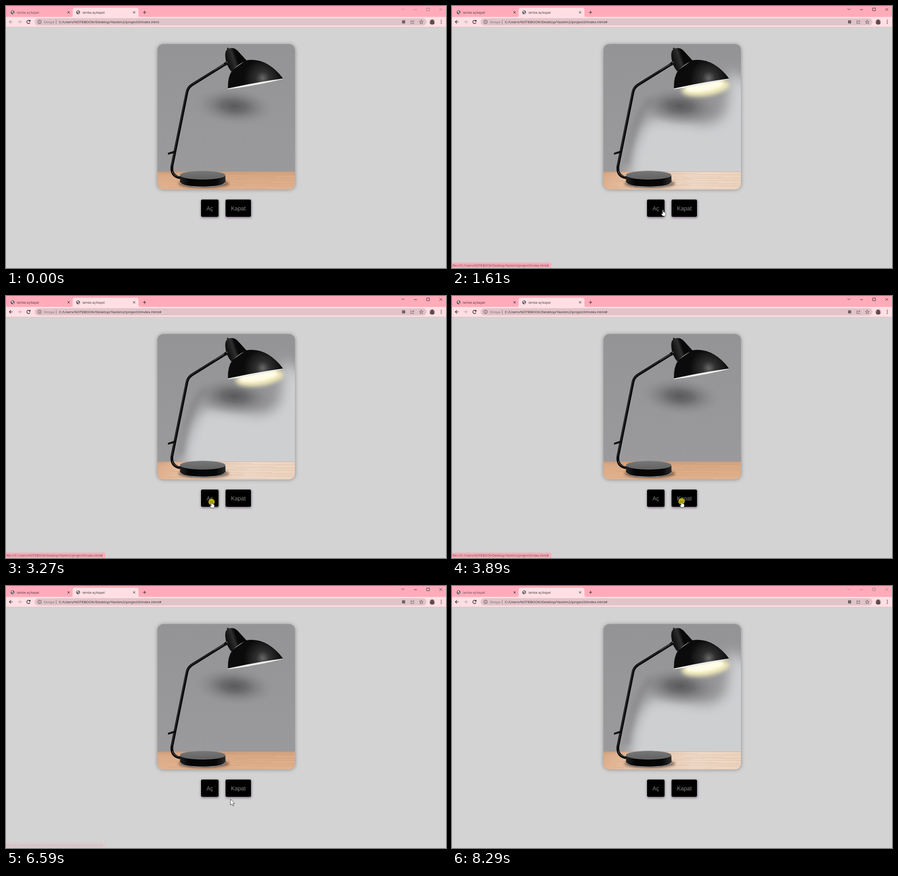
Animation, 970 px wide and 578 px high, one loop 8.35 s. Source, as an HTML page:

```html
<!DOCTYPE html>
<html lang="tr">
<head>
<meta charset="utf-8">
<title>lamba aç/kapat</title>
<style>
html, body { margin: 0; width: 100%; height: 100%; overflow: hidden; background: #d3d3d3; }
svg { display: block; width: 970px; height: 578px; }
text { font-family: "Open Sans", "Noto Sans", sans-serif; font-size: 6.85px; fill: #3b3033; }
.url { font-size: 8px; fill: #2b2528; }
.btn { font: 12.4px "Liberation Sans", Arial, sans-serif; fill: #858585; }
.line { fill: none; stroke: #222; }
.soft { stroke: #5a5053; }
</style>
</head>
<body>
<svg viewBox="0 0 970 578">
  <defs>
    <clipPath id="card"><rect x="334" y="84" width="303" height="320.500" rx="13"/></clipPath>
    <filter id="b2" x="-50%" y="-50%" width="200%" height="200%"><feGaussianBlur stdDeviation="2.500"/></filter>
    <filter id="b5" x="-50%" y="-50%" width="200%" height="200%"><feGaussianBlur stdDeviation="5"/></filter>
    <filter id="b13" x="-50%" y="-50%" width="200%" height="200%"><feGaussianBlur stdDeviation="13"/></filter>
    <linearGradient id="wall" x2="0" y2="1">
      <stop stop-color="#949496"/><stop offset="1" stop-color="#9a9a9c"/>
    </linearGradient>
    <linearGradient id="wood" x2="0" y2="1">
      <stop stop-color="#cf9f7e"/><stop offset=".25" stop-color="#dbaa86"/><stop offset="1" stop-color="#e2b28e"/>
    </linearGradient>
    <linearGradient id="litWood">
      <stop stop-color="#ecd0b9" stop-opacity="0"/><stop offset=".3" stop-color="#ecd0b9" stop-opacity=".8"/>
      <stop offset=".65" stop-color="#efdac9"/><stop offset="1" stop-color="#ecd3be"/>
    </linearGradient>
    <radialGradient id="blob">
      <stop stop-color="#5a5a5c"/><stop offset=".3" stop-color="#646466" stop-opacity=".85"/>
      <stop offset=".7" stop-color="#7d7d7f" stop-opacity=".35"/><stop offset="1" stop-color="#949496" stop-opacity="0"/>
    </radialGradient>
    <radialGradient id="shine" gradientUnits="userSpaceOnUse" cx="566" cy="159" r="42">
      <stop stop-color="#686868"/><stop offset=".35" stop-color="#303030"/><stop offset="1" stop-color="#0b0b0b"/>
    </radialGradient>
    <linearGradient id="neck" gradientUnits="userSpaceOnUse" x1="483" y1="120" x2="519" y2="108">
      <stop stop-color="#080808"/><stop offset=".5" stop-color="#2e2e2e"/><stop offset=".7" stop-color="#080808"/>
    </linearGradient>
    <linearGradient id="top" x2="0" y2="1"><stop stop-color="#777"/><stop offset="1" stop-color="#626262"/></linearGradient>
    <linearGradient id="side"><stop stop-color="#222"/><stop offset=".2" stop-color="#050505"/><stop offset=".8" stop-color="#080808"/><stop offset="1" stop-color="#2c2c2c"/></linearGradient>
    <g id="globe"><circle r="4.200" fill="#5c5358"/><path d="M-3-1Q-1-4 1-2.500T-1 .5ZM0 1.500L3 0 2 3 0 3Z" fill="#eadfe2"/></g>
    <path id="x" d="M-2.300-2.300 2.300 2.300M2.300-2.300-2.300 2.300"/>
  </defs>

  <!-- browser frame -->
  <rect width="970" height="25" fill="#ffabba"/>
  <rect y="24" width="970" height="22" fill="#ffdfe4"/>
  <path d="M0 46.500H970" stroke="#d8c2c7"/>
  <path d="M143 24Q147 24 147 20V9Q147 4 152 4H287Q292 4 292 9V20Q292 24 296 24Z" fill="#ffdfe4"/>
  <use href="#globe" x="14.500" y="14"/><use href="#globe" x="159" y="14"/>
  <text id="tab" x="24" y="16.500">lamba aç/kapat</text>
  <text x="168.500" y="16.500">lamba aç/kapat</text>
  <g class="line">
    <use href="#x" x="138" y="14"/><use href="#x" x="282.500" y="14"/>
    <path d="M302 14H309M305.500 10.500V17.500"/>
  </g>
  <g id="controls" class="line" stroke-width=".9">
    <path d="M872 5.500 875 8.500 878 5.500M899.500 8H906M927.500 4.500H933.500V10.500H927.500ZM955.500 4.500 961.500 10.500M961.500 4.500 955.500 10.500"/>
  </g>
  <path id="back" class="line" d="M15 35H7.500M11 31.300 7.300 35 11 38.700" stroke-width="1.200"/>
  <path class="line" d="M26 35H33.500M30 31.300 33.700 35 30 38.700" style="stroke:#a5959a"/>
  <path class="line" d="M52.700 33A3.700 3.700 0 1 0 53 36.500M53.300 30.800V33.700H50.300" stroke-width="1.300"/>
  <rect x="63" y="27" width="864" height="16" rx="8" fill="#e0c4c9"/>
  <g class="line soft">
    <circle cx="74" cy="35" r="3.900"/><path d="M74 34.300V37.200M74 32.300V33.400"/>
    <path d="M110.500 30.500V39.500" stroke-width=".7"/>
    <path d="M895 32.500H892.500V38.500H899V37M894.500 36Q895 33.500 899 33.500M897.500 31.500 899.700 33.500 897.500 35.500" stroke-width=".8"/>
    <path d="M915.500 30.800 916.700 33.800 919.700 34 917.300 36 918.200 39 915.500 37.300 912.800 39 913.700 36 911.300 34 914.300 33.800Z" stroke-width=".9"/>
  </g>
  <rect x="873" y="31.500" width="7" height="7" rx="1" fill="#6d6367"/>
  <text x="83.500" y="38" class="url" style="fill:#76676b">Dosya</text>
  <text x="116.500" y="38" class="url" id="url"></text>
  <circle cx="939.500" cy="35" r="6.300" fill="#cbb9b7"/>
  <path d="M934.500 39Q935 30 939.500 30T944.500 39Q940 43 934.500 39Z" fill="#604b4b"/>
  <g fill="#333"><circle cx="959.500" cy="31.500" r="1"/><circle cx="959.500" cy="35" r="1"/><circle cx="959.500" cy="38.500" r="1"/></g>

  <!-- picture -->
  <rect x="334" y="85" width="303" height="320" rx="13" fill="#555" opacity=".6" filter="url(#b5)"/>
  <g clip-path="url(#card)">
    <rect x="334" y="84" width="303" height="281" fill="url(#wall)"/>
    <g class="lit">
      <path d="M612 140 670 185V430H388L396 335Q412 268 440 248L560 262Q600 255 606 225Z" fill="#cecfd1" filter="url(#b13)"/>
      <path d="M440 205Q400 240 385 350" fill="none" stroke="#7e7e80" stroke-width="16" opacity=".4" filter="url(#b5)"/>
    </g>
    <ellipse cx="503" cy="221" rx="92" ry="43" transform="rotate(5 503 221)" fill="url(#blob)"/>
    <rect x="334" y="365" width="303" height="40" fill="url(#wood)"/>
    <rect class="lit" x="334" y="365" width="303" height="40" fill="url(#litWood)"/>
    <path d="M334 365.500H637" stroke="#b98f74" opacity=".5"/>
    <g id="grain" fill="none" stroke="#a97955" stroke-width=".7" opacity=".3"></g>
    <ellipse cx="436" cy="392" rx="56" ry="10" fill="#4a2f20" opacity=".55" filter="url(#b2)"/>

    <g fill="none">
      <path d="M487 126 410 174Q401 180 399 190L366 353Q363 375 384 379" stroke="#0a0a0a" stroke-width="6"/>
      <path d="M461 141 411 172.500Q400 179 397.500 190L365 353" stroke="#474747" stroke-width="1"/>
      <path d="M459 142 481 128.500" stroke="#4b4b4b" stroke-width="2"/>
      <path d="M482 129 488 125" stroke="#111" stroke-width="7"/>
      <path d="M367 364Q367 374 382 376" stroke="#b2a293" stroke-width=".8"/>
    </g>
    <path d="M372 319 357 324V328L372 324Z" fill="#111"/>
    <path d="M384 374 383.500 389Q386 400 433.500 400T484 389L483.500 374Z" fill="url(#side)"/>
    <path d="M384 389Q389 399 433.500 399T483.500 389" fill="none" stroke="#c9c9c9" stroke-width="1.100"/>
    <ellipse cx="433.500" cy="373" rx="50" ry="9.300" fill="url(#top)" stroke="#999" stroke-width=".6"/>

    <ellipse class="lit" cx="559" cy="180" rx="53" ry="18" transform="rotate(-8 559 180)" fill="#f1e9b9" filter="url(#b5)"/>
    <ellipse class="lit" cx="557" cy="177" rx="42" ry="11" transform="rotate(-9 557 177)" fill="#fffde7" filter="url(#b2)"/>
    <path d="M488 181.500 490 183.500Q552 176 611 161L609 157Z" fill="#ececea"/>
    <path d="M489 182Q488 157 498 142L529 120Q574 112 611 160Q552 168 489 182Z" fill="url(#shine)"/>
    <path d="M484 116Q481 97 491 94 502 90 511 99L531 121Q512 126 497 145Q485 130 484 116Z" fill="url(#neck)"/>
    <path d="M489 182Q488 157 498 143" fill="none" stroke="#8a8a8a" stroke-width=".7"/>
    <circle cx="489" cy="94" r="2" fill="#222"/>
    <circle cx="488" cy="125" r="3.500" fill="#161616"/><circle cx="487" cy="124" r=".9" fill="#aaa"/>
  </g>

  <!-- buttons -->
  <g fill="#432f48" opacity=".65" filter="url(#b2)">
    <rect x="430" y="428" width="39" height="39" rx="3"/><rect x="484" y="428" width="57" height="39" rx="3"/>
  </g>
  <rect x="430" y="427" width="38.500" height="38" rx="3"/><rect x="484" y="427" width="56" height="38" rx="3"/>
  <text x="442" y="450.500" class="btn">Aç</text><text x="496" y="450.500" class="btn">Kapat</text>

  <g id="status">
    <path d="M0 566H216Q219 566 219 569V578H0Z" fill="#ffabba"/>
    <text x="1" y="575" id="link" style="fill:#654048"></text>
  </g>
  <g id="cursor">
    <circle id="press" r="7" fill="#d9d000" opacity=".8"/>
    <path id="arrow" d="M0 0V13.500L3.200 10.700 5.300 15.500 7.300 14.600 5.200 10H9.300Z" fill="#fff" stroke="#222" stroke-width=".8"/>
    <path id="hand" d="M-1 0Q0-1 1 0V4.500Q2.200 3.800 3 5 4.300 4.600 5 6 6.300 5.700 6.300 7.500V10L5 13.500H-.5L-4 8.500Q-3.700 6.800-1 9Z" fill="#fff" stroke="#222" stroke-width=".7"/>
  </g>
</svg>
<script>
const $ = id => document.getElementById(id);
const LOOP = 8350, path = 'C:/Users/NOTEBOOK/Desktop/Yazılım2/project3/index.html';
const clicks = [1400, 2250, 3250, 3840, 4450, 4900, 5350, 6000, 6980];
// time, x, y of the pointer tip
const route = [
  [310, 868, 570], [700, 590, 535], [950, 353, 492], [1140, 405, 473], [1290, 448, 456],
  [1430, 454, 453], [1610, 465, 450], [2050, 504, 452], [2300, 506, 454], [2500, 497, 463],
  [2700, 493, 469], [2930, 480, 471], [3150, 452, 456], [3350, 454, 453], [3740, 504, 452],
  [3890, 506, 453], [4370, 455, 453], [4520, 457, 452], [4840, 500, 454], [4960, 503, 455],
  [5280, 457, 455], [5490, 456, 453], [5900, 503, 455], [6060, 506, 456], [6300, 501, 494],
  [6590, 495, 470], [6880, 456, 455], [7330, 456, 449], [7600, 590, 495], [7990, 918, 578]
];
// time, opacity of the link bubble
const bubble = [[1240, 0], [1330, 1], [2900, 1], [3020, .6], [3140, 1], [6430, 1], [6630, 0], [6840, 0], [6920, 1], [7560, 1], [7740, 0]];

function sample(keys, t) {
  const i = keys.findIndex(k => k[0] > t);
  if (i < 0) return keys.at(-1).slice(1);
  if (!i) return keys[0].slice(1);
  const a = keys[i - 1], b = keys[i], u = (t - a[0]) / (b[0] - a[0]);
  return a.slice(1).map((v, n) => v + (b[n + 1] - v) * u);
}

const show = (el, on) => el.style.display = on ? '' : 'none';
const inside = (x, y) => y > 427 && y < 465 && (x > 430 && x < 468 || x > 484 && x < 540);

let grain = '';
for (let i = 0; i < 15; i++) {
  const y = 367 + i * 2.5, x = 334 + i * 71 % 180;
  grain += `M${x} ${y}q60 ${Math.sin(i * 4)} ${90 + i * 47 % 120} 0`;
}
$('grain').innerHTML = `<path d="${grain}"/>`;
$('link').textContent = `file:///${path}#`;

function draw(t) {
  const used = t >= clicks[0], focused = used && t < 8290;
  const lit = clicks.filter(c => c <= t).length % 2;
  document.querySelectorAll('.lit').forEach(el => show(el, lit));
  $('url').textContent = path + (used ? '#' : '');
  $('back').style.stroke = used ? '#222' : '#a08c92';
  $('controls').style.stroke = focused ? '#30262a' : '#a9757f';
  $('tab').style.fill = focused ? '#4a353a' : '#654a51';
  $('status').style.opacity = sample(bubble, t)[0];

  const [x, y] = sample(route, t), over = inside(x, y);
  $('cursor').setAttribute('transform', `translate(${x} ${y})`);
  show($('cursor'), t >= 310 && t < 7960);
  show($('hand'), over);
  show($('arrow'), !over);
  show($('press'), clicks.some(c => t > c - 90 && t < c + 80));
}

const start = performance.now();
function tick(now) {
  draw(Math.max(0, now - start) % LOOP);
  requestAnimationFrame(tick);
}
draw(0);
requestAnimationFrame(tick);
</script>
</body>
</html>
```
